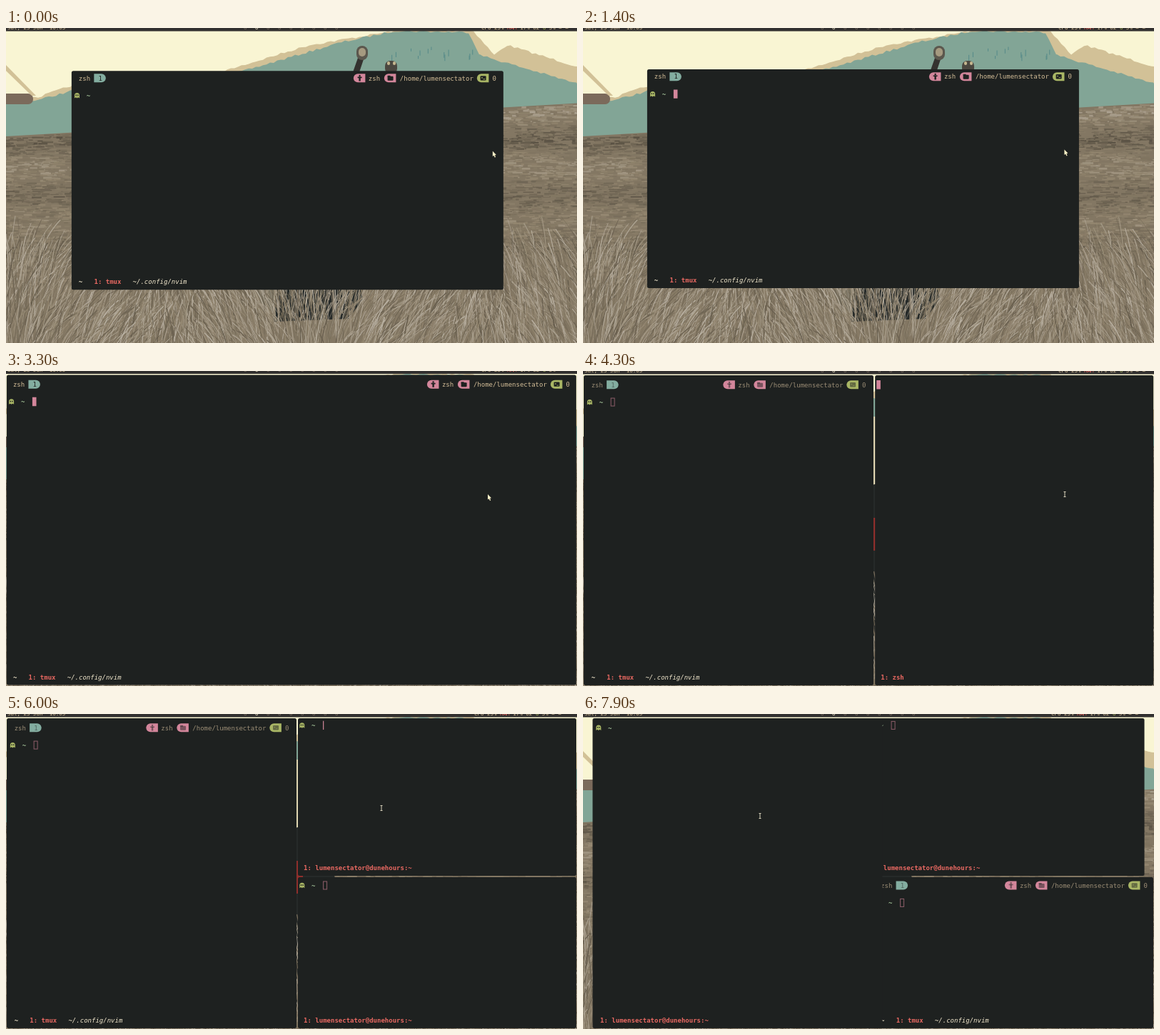
Animation of 800 by 442 pixels, one loop 8 s. Source, as an HTML page with a canvas:

```html
<!DOCTYPE html>
<html lang="en">
<head>
<meta charset="utf-8">
<title>Tiling desktop</title>
<style>
  html, body { margin: 0; width: 100%; height: 100%; overflow: hidden; background: #1e2120; }
  canvas { display: block; width: 800px; height: 442px; }
</style>
</head>
<body>
<canvas id="stage" width="800" height="442"></canvas>
<script>
const LOOP = 8000, SLIDE = 435, DROP = 1430, SPAWN = 3930;
const CELL_W = 5.415, CELL_H = 12.2;
const USER = 'lumensectator', HOST = 'dunehours';
const FONT = '9px "DejaVu Sans Mono", "Liberation Mono", monospace';
const C = {
  panel: '#1e2120', bar: '#32302f', text: '#d4be98', dim: '#9c8e76', white: '#f2e8cd', red: '#ea6962',
  pink: '#d3869b', teal: '#83ada0', green: '#a9b665', tilde: '#a5c49a', pointer: '#d8d2ba'
};
let g = document.getElementById('stage').getContext('2d');

// Tiles split the work area; new windows enter a little outside their tile.
const LEFT = 1, TOP = 6, SPLIT_X = 409, SPLIT_Y = 229, RIGHT = 799, BOTTOM = 441;
const tile = (x, y, right, bottom, shiftX = 0, shiftY = 0) => ({ x: x + shiftX, y: y + shiftY, w: right - x, h: bottom - y });
const SLOT = {
  dragged: { x: 92, y: 60, w: 605, h: 307 },
  full: tile(LEFT, TOP, RIGHT, BOTTOM),
  screen: tile(0, 0, 800, 442),
  left: tile(LEFT, TOP, SPLIT_X - 2, BOTTOM),
  right: tile(SPLIT_X, TOP, RIGHT, BOTTOM),
  top: tile(SPLIT_X, TOP, RIGHT, SPLIT_Y - 2),
  bottom: tile(SPLIT_X, SPLIT_Y, RIGHT, BOTTOM),
  enterRight: tile(SPLIT_X, TOP, RIGHT, BOTTOM, 60),
  enterBottom: tile(SPLIT_X, SPLIT_Y, RIGHT, BOTTOM, 0, 60)
};

const tmux = {
  tmux: true, born: 0, ready: 0,
  track: [[0, 'dragged'], [DROP, 'full'], [2520, 'screen'], [3060, 'full'], [SPAWN, 'left'], [6150, 'top'], [7130, 'bottom']]
};
const shellA = {
  born: SPAWN, ready: 4360,
  track: [[0, 'enterRight'], [SPAWN, 'right'], [5050, 'top'], [6150, 'left'], [6702, 'bottom'], [7130, 'top'], [7602, 'left']]
};
const shellB = {
  born: 5050, ready: 5470,
  track: [[0, 'enterBottom'], [5050, 'bottom'], [6560, 'left'], [7602, 'top']]
};
const CURSOR_OFF = [[0, 300], [2100, 2500], [4800, 5050], [7650, LOOP]];
const POINTER = [[5600, 675, 173], [6000, 526, 132], [7000, 599, 318], [7900, 248, 143]];

const clamp = p => Math.min(1, Math.max(0, p));
const mix = (a, b, p) => a + (b - a) * p;
const easeOut = p => 1 - (1 - clamp(p)) ** 3;
const smooth = p => p * p * (3 - 2 * p);

// A swing that dies out by the time the window is dropped.
function drag(t) {
  const p = t / 800, swing = 1 - clamp(t / DROP);
  return {
    x: -2.5 * clamp(p) - 20 * swing * Math.sin(2 * Math.PI * p),
    y: -2 * clamp(p) + 10 * swing * Math.sin(4 * Math.PI * p)
  };
}

function slotAt(name, t) {
  const slot = SLOT[name];
  if (name !== 'dragged') return slot;
  const d = drag(t);
  return { ...slot, x: slot.x + d.x, y: slot.y + d.y };
}

// The size snaps to the new slot; only the position glides.
function place(win, t) {
  const i = win.track.findLastIndex(([start]) => t >= start);
  const [start, name] = win.track[i];
  const to = slotAt(name, t), from = i ? slotAt(win.track[i - 1][1], t) : to;
  const p = easeOut((t - start) / SLIDE);
  return { ...to, x: mix(from.x, to.x, p), y: mix(from.y, to.y, p) };
}

function pointerAt(t) {
  if (t < DROP) {
    const d = drag(t);
    return [682 + d.x - 5.5 * clamp(t / 800), 172.5 + d.y];
  }
  const i = POINTER.findIndex(([time]) => time > t);
  if (i < 1) return POINTER.at(i).slice(1);
  const [a, b] = [POINTER[i - 1], POINTER[i]], p = smooth((t - a[0]) / (b[0] - a[0]));
  return [mix(a[1], b[1], p), mix(a[2], b[2], p)];
}

function rect(x, y, w, h, color, radius = 0) {
  g.fillStyle = color;
  g.beginPath();
  g.roundRect(x, y, w, h, radius);
  g.fill();
}

function poly(color, points) {
  g.fillStyle = color;
  g.beginPath();
  for (const [x, y] of points) g.lineTo(x, y);
  g.fill();
}

function write(str, x, y, color, style = '') {
  g.font = style + ' ' + FONT;
  g.fillStyle = color;
  g.fillText(str, x, y + 3.3);
}

function ghost(x, y) {
  g.fillStyle = C.green;
  g.beginPath();
  g.arc(x + 3.7, y - .2, 3.5, Math.PI, 0);
  for (let i = 0; i <= 4; i++) g.lineTo(x + 7.2 - i * 1.75, y + (i % 2 ? 2.6 : 3.8));
  g.fill();
  for (const eye of [1.7, 4.3]) rect(x + eye, y - 1.2, 1.4, 1.6, C.panel);
}

const ICON = {
  person(x, y) {
    rect(x - 1.2, y - 4.5, 2.4, 2.4, C.panel, 1.2);
    rect(x - 3, y - 1.8, 6, 1.6, C.panel);
    rect(x - 1.2, y - 1.8, 2.4, 6, C.panel);
  },
  folder(x, y) {
    rect(x - 4, y - 3.5, 4, 2, C.panel);
    rect(x - 4, y - 2.5, 8, 6, C.panel, 1);
  },
  terminal(x, y) {
    rect(x - 4, y - 3.2, 8, 6.4, C.panel, 1);
    rect(x - 2.4, y - 1.4, 1.5, 1.5, C.green);
    rect(x, y + 1, 2.5, .9, C.green);
  },
  one(x, y) { write('1', x - 2.5, y, C.panel); }
};

function badge(x, y, color, icon, focused) {
  rect(x, y - 6, 16.5, 12, color, icon === 'one' ? [0, 6, 6, 0] : [6, 0, 0, 6]);
  g.globalAlpha = focused ? 1 : .5;
  ICON[icon](x + 8.7, y);
  g.globalAlpha = 1;
}

function header(x, right, y, focused) {
  const color = focused ? C.text : C.dim;
  write('zsh', x, y, color);
  badge(x + 21.5, y, C.teal, 'one', focused);
  badge(right - 200, y, C.pink, 'person', focused);
  write('zsh', right - 179, y, color);
  badge(right - 157, y, C.pink, 'folder', focused);
  write('/home/' + USER, right - 135, y, color);
  badge(right - 27, y, C.green, 'terminal', focused);
  write('0', right - 5.4, y, color);
}

function textCursor(x, y, kind, t) {
  if (kind === 'hollow') {
    g.strokeStyle = '#8d5e69';
    g.lineWidth = 1;
    g.strokeRect(x + .5, y - 5.5, 5, 11);
  } else if (!CURSOR_OFF.some(([from, to]) => t >= from && t < to)) {
    rect(x, y - 6.2, kind === 'beam' ? 1.2 : 5.6, 12.4, C.pink);
  }
}

function drawWindow(win, t, focused) {
  if (t < win.born) return;
  const { x, y, w, h } = place(win, t);
  // The character grid is centred, so leftover space becomes padding.
  const padX = 8 + w % CELL_W / 2, padY = 9.2 + h % CELL_H / 2;
  const textX = x + padX, tabY = y + h - 11;
  let rowY = y + padY;
  g.save();
  rect(x, y, w, h, C.panel, 2.5);
  g.clip();
  if (win.tmux) {
    header(textX, x + w - padX, rowY, focused);
    rowY += 2 * CELL_H;
    write('~', textX, tabY, C.white, 'bold');
    write('1: tmux', textX + 4 * CELL_W, tabY, C.red, 'bold');
    write('~/.config/nvim', textX + 14 * CELL_W, tabY, C.white, 'italic');
  } else {
    write(t < win.ready ? '1: zsh' : `1: ${USER}@${HOST}:~`, textX, tabY, C.red, 'bold');
  }
  if (t < win.ready) {
    textCursor(textX - 6, rowY, focused ? 'block' : 'hollow', t);
  } else {
    ghost(textX - 6, rowY);
    write('~', textX + 11, rowY, C.tilde, 'bold');
    textCursor(textX + 27, rowY, !focused ? 'hollow' : win.tmux ? 'block' : 'beam', t);
  }
  g.restore();
}

// Only the lower edge of the bar's text is visible; it leaves while a window fills the screen.
function topBar(t) {
  g.save();
  g.translate(0, Math.min(0, place(tmux, t).y - TOP));
  rect(0, 0, 800, 4.6, C.bar);
  g.beginPath();
  g.rect(0, 0, 800, 4.6);
  g.clip();
  g.font = '7.5px "DejaVu Sans Mono", monospace';
  const label = (str, x, color) => { g.fillStyle = color; g.fillText(str, x, 1.5); };
  label('Sat, 25 Jan  16:05', 2, C.text);
  for (let i = 0; i < 9; i++) label('o', 333 + i * 16, i === 1 ? C.white : '#7c6f64');
  const x = t < 5000 ? 666 : 656;
  label('CPU 23%     17% 62   5% = =', x, C.text);
  label('RAM', x + 36, C.red);
  label('o', x + 86, C.green);
  g.restore();
}

function pointer(t) {
  const [x, y] = pointerAt(t);
  if (t < SPAWN) {
    poly('#fbf1c7', [[0, 0], [0, 7.5], [1.6, 6.2], [3, 9], [4.2, 8.4], [3, 5.8], [5, 5.3]].map(([dx, dy]) => [x + dx, y + dy]));
  } else {
    rect(x - .5, y - 3.5, 1, 7, C.pointer);
    for (const end of [-4, 3]) rect(x - 1.5, y + end, 3, 1, C.pointer);
  }
}

function paintWallpaper() {
  const layer = document.createElement('canvas');
  layer.width = 800;
  layer.height = 442;
  const screen = g;
  g = layer.getContext('2d');
  let seed = 7;
  const rnd = () => (seed = seed * 16807 % 2147483647) / 2147483647;
  const earth = lightness => `hsl(38 14% ${lightness}%)`;

  // A rough ridge through a few points, filled down to the floor.
  function ridge(color, points, floor) {
    const line = [];
    points.slice(1).forEach(([x2, y2], i) => {
      const [x1, y1] = points[i];
      for (let x = x1; x < x2; x += 5) line.push([x, mix(y1, y2, (x - x1) / (x2 - x1)) + rnd() * 3 - 1.5]);
    });
    poly(color, [...line, points.at(-1), [points.at(-1)[0], floor], [points[0][0], floor]]);
  }

  rect(0, 0, 800, 442, '#f9f5d3');
  const tan = '#d2c197', teal = '#82a596';
  ridge(tan, [[300, 62], [425, 24], [545, 4], [655, 4], [684, 38], [702, 24], [800, 54]], 120);
  ridge(teal, [[320, 64], [470, 20], [545, 4], [648, 6], [664, 38], [800, 78]], 120);
  ridge(tan, [[0, 92], [45, 97], [100, 78]], 120);
  ridge(teal, [[0, 104], [45, 101], [100, 86]], 156);
  rect(-10, 92, 48, 15, '#7b6a5b', 7);
  poly(tan, [[0, 52], [42, 95], [36, 95], [0, 60]]);
  for (let i = 0; i < 14; i++) rect(505 + rnd() * 150, 24 + rnd() * 15, 1, 4 + rnd() * 6, '#568a89');

  // field: light and dark bands that fade with distance
  const horizon = x => 152 - x * .058;
  const tone = y => 45 + 10 * Math.cos((y - 118) / 78 * 2 * Math.PI) * Math.exp((118 - y) / 150);
  poly(earth(45), [[0, horizon(0)], [800, horizon(800)], [800, 442], [0, 442]]);
  for (let i = 0; i < 9000; i++) {
    const x = rnd() * 820 - 20, y = horizon(x) + rnd() * 210;
    rect(x, y, 3 + rnd() * 14, 1 + rnd() * 2, earth(tone(y) + rnd() * 14 - 7));
  }

  // standing figure, mostly behind the windows
  rect(398, 64, 24, 100, '#e0d6b2');
  poly('#262a29', [[405, 160], [440, 150], [500, 380], [480, 408], [375, 412], [380, 365]]);
  rect(404, 206, 12, 46, '#8f2f2c');
  poly('#77705f', [[352, 367], [380, 367], [372, 402], [360, 396]]);
  // microphone and its neighbour
  poly('#34322f', [[493, 42], [501, 44], [495, 62], [486, 62]]);
  rect(491, 25, 16, 20, '#5b574d', 8);
  rect(494, 28, 10, 12, '#a59a80', 5);
  rect(531, 46, 17, 18, '#4b4740', 7);
  for (const x of [534, 542]) rect(x, 47, 4, 5, '#c5b68f', 2);

  // grass
  const blades = 4200;
  for (let i = 0; i < blades; i++) {
    const x = rnd() * 880 - 40, y = 325 + i / blades * 150;
    const length = 18 + rnd() * 45, lean = 22 * Math.sin(x / 70) + (rnd() - .4) * 36;
    g.strokeStyle = earth(34 + rnd() * 36);
    g.lineWidth = .5 + rnd() * .8;
    g.beginPath();
    g.moveTo(x, y);
    g.quadraticCurveTo(x + lean * .3, y - length * .6, x + lean, y - length);
    g.stroke();
  }
  g = screen;
  return layer;
}

const wallpaper = paintWallpaper();

function draw(t) {
  const focus = t < SPAWN ? tmux : t >= 5050 && t < 5700 ? shellB : shellA;
  g.drawImage(wallpaper, 0, 0);
  topBar(t);
  for (const win of [tmux, shellB, shellA]) drawWindow(win, t, win === focus);
  pointer(t);
}

const begin = performance.now();
function tick(now) {
  draw(Math.max(0, now - begin) % LOOP);
  requestAnimationFrame(tick);
}
draw(0);
requestAnimationFrame(tick);
</script>
</body>
</html>
```
